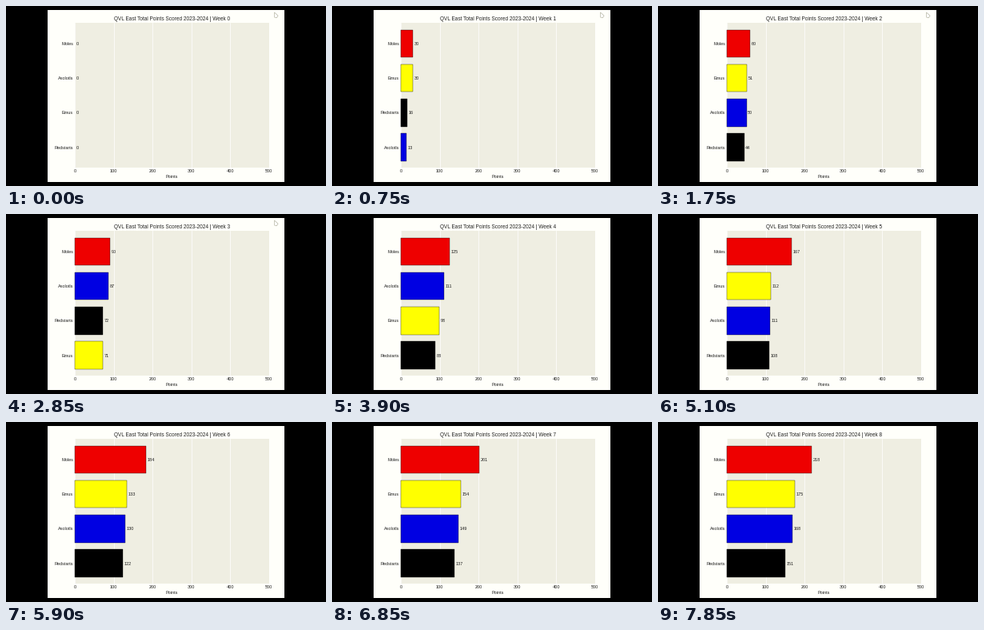
Write a matplotlib script that moves like this. It is 400 px wide and 225 px high and loops after 8 s.

```python
import numpy as np
import matplotlib.pyplot as plt
from matplotlib.animation import FuncAnimation
from matplotlib.patches import Polygon, Rectangle

W, H, DPI = 400, 225, 100
INTERVAL, LOOP = 50, 8000
PAGE, PLOT, INK = "#fffffa", "#efeee2", "#222222"
LEFT, TOP, BOTTOM, SCALE = 86.3, 21.4, 202, 0.4845  # SCALE: pixels per point
ROW_Y, ROW_STEP, BAR_HEIGHT = 47, 43.2, 34.5

# Bar colour and running total at each key week; other weeks are interpolated
KEY_WEEKS = [0, 1, 3, 4, 5, 8]
TEAMS = {
    "Moles": ("#ee0000", [0, 30, 90, 125, 167, 218]),
    "Axolotls": ("#0000e2", [0, 13, 87, 111, 111, 168]),
    "Emus": ("#ffff00", [0, 30, 71, 98, 112, 175]),
    "Redstarts": ("#000000", [0, 16, 72, 88, 108, 151]),
}

fig = plt.figure(figsize=(W / DPI, H / DPI), dpi=DPI, facecolor="black")
ax = fig.add_axes([0, 0, 1, 1])
ax.set(xlim=(0, W), ylim=(H, 0))
ax.axis("off")


def box(x, y, width, height, color, z, edge=0):
    return ax.add_patch(Rectangle((x, y), width, height, fc=color, ec="black",
                                  lw=edge, zorder=z))


def write(x, baseline, text="", ha="center", px=5.45):
    return ax.text(x, baseline, text, ha=ha, va="baseline", color=INK,
                   fontsize=px * 72 / DPI, family="Liberation Sans", zorder=5)


def week_at(t):
    return int(np.interp(t, [0, 750, 1750, 2850, 7850], [0, 1, 2, 3, 8]) + 1e-6)


def total_at(team, week):
    return np.interp(week, KEY_WEEKS, TEAMS[team][1])


box(52, 5, 296, 215, PAGE, 0)
box(LEFT, TOP, 500 * SCALE, BOTTOM - TOP, PLOT, 1)
for points in range(0, 501, 100):
    x = LEFT + points * SCALE
    ax.plot([x, x], [TOP, BOTTOM], color="white", lw=0.5, zorder=2)
    write(x, 208, str(points))
center = LEFT + 250 * SCALE
write(center, 215, "Points", px=5.5)
title = write(center, 18.3, px=6.55)

rows = []
for i in range(len(TEAMS)):
    y = ROW_Y + i * ROW_STEP
    rows.append((box(LEFT, y - BAR_HEIGHT / 2, 0, BAR_HEIGHT, "black", 3, 0.25),
                 write(84, y + 2, ha="right"),
                 write(LEFT, y + 2, ha="left")))

pointer_shape = np.array([(0, 0), (0, 6), (2.7, 6.8), (4.6, 4.2)])
pointer = ax.add_patch(Polygon(pointer_shape, fc="white", ec="#a5a590",
                               lw=0.4, zorder=6))


def update(frame):
    t = frame * INTERVAL
    week = week_at(t)
    title.set_text(f"QVL East Total Points Scored 2023-2024 | Week {week}")
    ranking = sorted(TEAMS, key=lambda team: -total_at(team, week))
    for (bar, name, value), team in zip(rows, ranking):
        total = total_at(team, week)
        bar.set_width(total * SCALE)
        bar.set_facecolor(TEAMS[team][0])
        bar.set_visible(total > 0)
        name.set_text(team)
        value.set_text(f"{int(total + 0.5)}")
        value.set_x(LEFT + total * SCALE + 1.6)
    # The pointer slides off to the right
    pointer.set_xy(pointer_shape + (335.5 + 8 * (t >= 3550), 8))
    pointer.set_visible(t < 3650)
    return []


anim = FuncAnimation(fig, update, frames=LOOP // INTERVAL, interval=INTERVAL,
                     repeat=True, repeat_delay=0)
plt.show()
```
